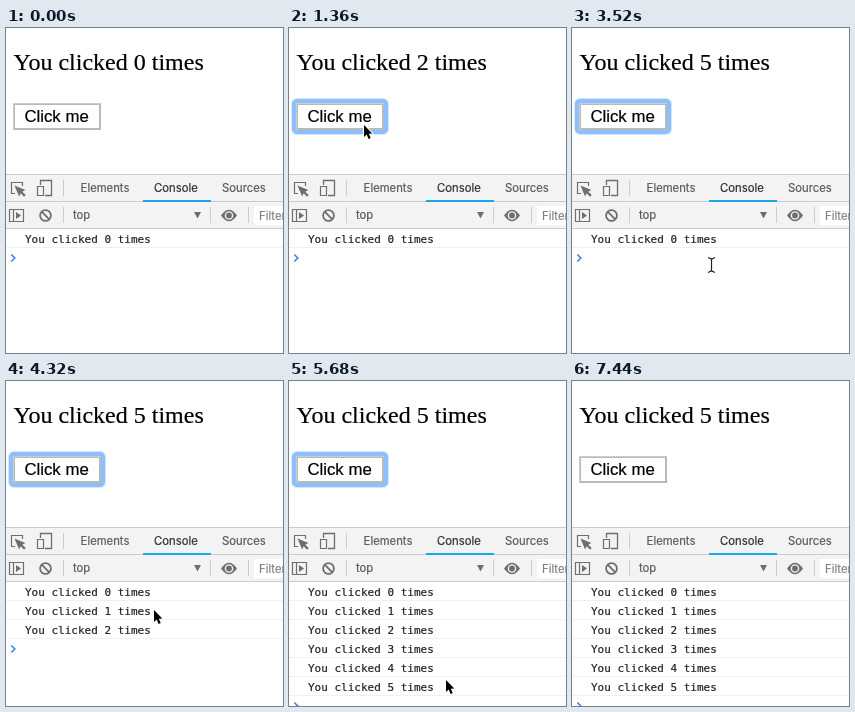
These frames come from a looping animation (277x325 px, 7520 ms). An HTML page with a canvas:

```html
<!DOCTYPE html>
<html lang="en">
<head>
<meta charset="utf-8">
<title>Click counter</title>
<style>
  html, body { margin: 0; width: 277px; height: 325px; overflow: hidden; background: #fff; }
  canvas { display: block; }
</style>
</head>
<body>
<canvas id="stage" width="277" height="325"></canvas>
<script>
const ctx = document.getElementById('stage').getContext('2d');

const LOOP = 7520, STEP = 80;
const CLICKS = 5, FIRST_CLICK = 960, CLICK_GAP = 440, LOG_DELAY = 2880;
const FOCUS_START = FIRST_CLICK - STEP, FOCUS_END = 7440;
const ROW = 19, CONSOLE_TOP = 201;

const SERIF = '24px "Liberation Serif", "Times New Roman", serif';
const BUTTON = '16.8px "Liberation Sans", Arial, sans-serif';
const UI = '11.3px Inter, sans-serif';
const MONO = '11px "DejaVu Sans Mono", monospace';
const GRAY = '#6e6e6e', EDGE = '#cccccc', PANEL = '#f3f3f3';

const START = { x: 208, y: 147 };
const moves = [
  { from: 80, to: 400, x: 75, y: 97 },
  { from: 2800, to: 3200, x: 139, y: 237 },
  { from: 3520, to: 3680, x: 147, y: 222 },
  { from: 4080, to: 5120, x: 157, y: 273 },
  { from: 5120, to: 5840, x: 157, y: 303 },
  { from: 6160, to: 6400, x: 170, y: 330 }
];

const snap = t => Math.floor(t / STEP) * STEP;
const clickTime = i => snap(FIRST_CLICK + CLICK_GAP * i);

function clicksBefore(t) {
  let n = 0;
  while (n < CLICKS && clickTime(n) <= t) n++;
  return n;
}

function pointerAt(t) {
  let { x, y } = START;
  for (const m of moves) {
    const p = Math.min(1, Math.max(0, (t - m.from) / (m.to - m.from)));
    const eased = p * p * (3 - 2 * p);
    x += (m.x - x) * eased;
    y += (m.y - y) * eased;
  }
  return { x: Math.round(x), y: Math.round(y) };
}

function rect(x, y, w, h, color) {
  ctx.fillStyle = color;
  ctx.fillRect(x, y, w, h);
}

function fill(color) {
  ctx.fillStyle = color;
  ctx.fill();
}

function stroke(color, width) {
  ctx.strokeStyle = color;
  ctx.lineWidth = width;
  ctx.stroke();
}

// A hairline outline gives the text its slightly heavy smoothing.
function text(str, x, y, font, color) {
  ctx.font = font;
  ctx.fillStyle = ctx.strokeStyle = color;
  ctx.lineWidth = 0.2;
  ctx.fillText(str, x, y);
  ctx.strokeText(str, x, y);
}

function trace(points, close) {
  ctx.beginPath();
  points.forEach(([x, y]) => ctx.lineTo(x, y));
  if (close) ctx.closePath();
}

function line(points, color, width) {
  trace(points);
  stroke(color, width);
}

function shape(points, color) {
  trace(points, true);
  fill(color);
}

function circle(x, y, r) {
  ctx.beginPath();
  ctx.arc(x, y, r, 0, Math.PI * 2);
}

function box(x, y, w, h) {
  ctx.beginPath();
  ctx.rect(x, y, w, h);
  stroke(GRAY, 1.2);
}

function arrow(x, y, turn, color, outline) {
  ctx.save();
  ctx.translate(x, y);
  ctx.rotate(turn);
  ctx.lineJoin = 'round';
  trace([[0, 0], [0, 12], [2.7, 9.5], [4.6, 14], [6.7, 13.1], [4.8, 8.7], [8.3, 8.4]], true);
  if (outline) stroke(outline, 2);
  fill(color);
  ctx.restore();
}

function drawButton(focused, pressed) {
  if (focused) {
    ['#d3e7fe', '#8cbffb'].forEach((color, i) => {
      ctx.beginPath();
      ctx.roundRect(2 + i, 70 + i, 98 - 2 * i, 37 - 2 * i, 6 - i);
      fill(color);
    });
  }
  rect(7, 75, 88, 27, pressed ? '#70757d' : '#cdcdcd');
  rect(8, 76, 87, 26, pressed ? '#d0d0d0' : '#b9b9b9');
  rect(9, 77, 84, 23, '#fff');
  text('Click me', 18.4, 94, BUTTON, '#000');
}

function drawTabs() {
  rect(0, 146, 277, 55, PANEL);
  rect(0, 146, 277, 1, EDGE);
  rect(0, 173, 277, 1, EDGE);
  rect(137, 172, 68, 2, '#18a6ee');
  rect(57, 152, 1, 16, EDGE);
  text('Elements', 74.6, 164, UI, '#5a5a5a');
  text('Console', 148, 164, UI, '#303030');
  text('Sources', 216, 164, UI, '#5a5a5a');

  // Inspect icon
  line([[9, 165.5], [5.5, 165.5], [5.5, 154.5], [16.5, 154.5], [16.5, 158]], GRAY, 1.2);
  arrow(8.5, 157.5, -Math.PI / 8, GRAY);

  // Device icon
  line([[34.5, 157], [34.5, 152.5], [45.5, 152.5], [45.5, 167.5], [39, 167.5]], GRAY, 1.3);
  box(31.5, 158.5, 6, 9);
}

function drawToolbar() {
  rect(0, CONSOLE_TOP - 1, 277, 1, EDGE);
  [57, 204, 242].forEach(x => rect(x, 179, 1, 16, EDGE));

  // Sidebar icon
  box(3.5, 181.5, 14, 12);
  line([[7.5, 181], [7.5, 194]], GRAY, 1.2);
  shape([[10, 184], [15, 187.5], [10, 191]], GRAY);

  // Clear icon
  circle(39.5, 187.5, 5.4);
  stroke(GRAY, 1.8);
  line([[35.7, 183.7], [43.3, 191.3]], GRAY, 1.8);

  text('top', 67, 191, UI, '#5a5a5a');
  shape([[188, 184], [195, 184], [191.5, 190.5]], GRAY);

  // Eye icon
  ctx.beginPath();
  ctx.moveTo(215, 187.5);
  ctx.quadraticCurveTo(223, 176, 231, 187.5);
  ctx.quadraticCurveTo(223, 199, 215, 187.5);
  fill(GRAY);
  circle(223, 187.5, 3.6);
  stroke(PANEL, 1.4);

  rect(248, 178, 29, 19, '#fff');
  text('Filter', 253, 192, UI, '#808080');
}

function drawConsole(logs) {
  for (let i = 0; i <= logs; i++) {
    const top = CONSOLE_TOP + ROW * i;
    text(`You clicked ${i} times`, 19, top + 14, MONO, '#222');
    rect(0, top + ROW - 1, 277, 1, '#f0f0f0');
  }
  const y = CONSOLE_TOP + ROW * (logs + 1) + 10;
  line([[5.3, y - 3.5], [8.8, y], [5.3, y + 3.5]], '#3b82f2', 1.6);
}

function drawBeam(x, y) {
  [['#fff', 2.6], ['#222', 1.2]].forEach(([color, width]) => {
    line([[x, y - 6], [x, y + 6]], color, width);
    [-1, 1].forEach(side => {
      line([[x - 3.5, y + 7.5 * side], [x, y + 6 * side], [x + 3.5, y + 7.5 * side]], color, width);
    });
  });
}

function drawPointer(t, logs, pressed) {
  const { x, y } = pointerAt(t);
  if (pressed) {
    circle(x + 3, y + 7, 16.5);
    fill('rgba(255, 255, 255, 0.5)');
    stroke('#111', 1.1);
  }
  const overPrompt = y >= CONSOLE_TOP + ROW * (logs + 1);
  if (overPrompt) drawBeam(x + 0.5, y);
  else arrow(x, y, 0, '#000', '#fff');
}

function draw(t) {
  const count = clicksBefore(t);
  const logs = clicksBefore(t - LOG_DELAY);
  const pressed = clicksBefore(t + STEP) > count;
  const pointerShown = t >= moves[0].from && t < moves.at(-1).to;

  rect(0, 0, 277, 325, '#fff');
  text(`You clicked ${count} times`, 7.5, 42, SERIF, '#000');
  drawButton(t >= FOCUS_START && t < FOCUS_END, pressed);
  drawTabs();
  drawToolbar();
  drawConsole(logs);
  if (pointerShown) drawPointer(t, logs, pressed);
}

const start = performance.now();
function tick() {
  draw(snap((performance.now() - start) % LOOP));
  requestAnimationFrame(tick);
}
tick();
</script>
</body>
</html>
```
